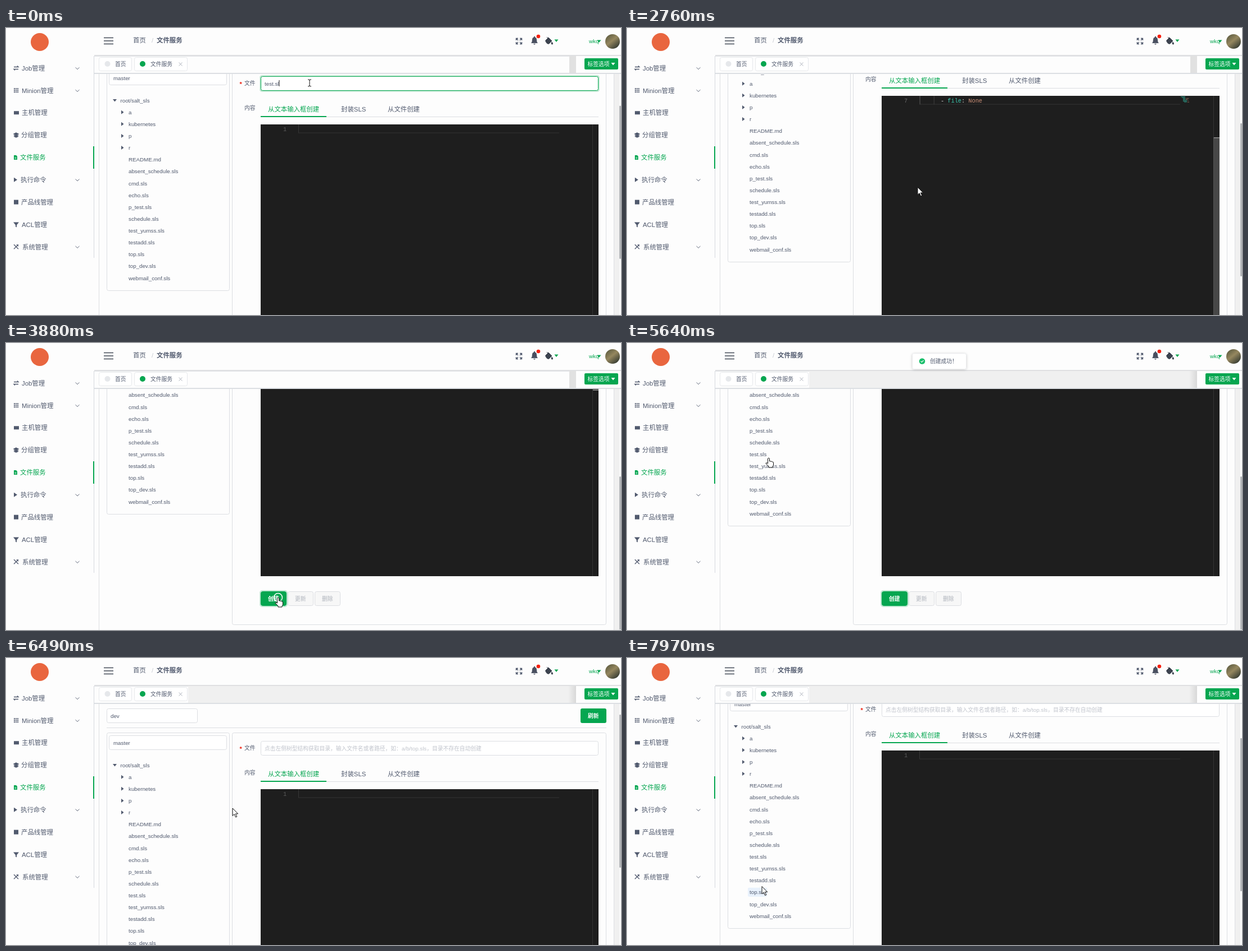
Animation, 1094 px wide and 512 px high, one loop 8 s. Source, as an HTML page:

```html
<!DOCTYPE html>
<html lang="zh">
<head>
<meta charset="utf-8">
<style>
html, body { margin: 0; width: 100%; height: 100%; overflow: hidden; background: #fdfdfd; }
svg { display: block; }
text { font-family: "Liberation Sans", "Noto Sans CJK SC", "Noto Sans CJK", sans-serif; white-space: pre; }
.code text { font-family: "Liberation Mono", "Noto Sans Mono", monospace; }
</style>
</head>
<body>
<svg id="stage" width="1094" height="512" viewBox="0 0 1094 512"></svg>
<script>
const GREEN = '#05a650', INK = '#515a6e', LINE = '#dcdee2', SMALL = 9.75, MID = 11.4;
const ROW = 21.13, CODE_ROW = 15.4, LOOP = 8000;

// Markup helpers; text is placed by the middle of its line.
const text = (s, x, y, size = SMALL, fill = INK, more = '') =>
  `<text x="${x}" y="${y + size * .37}" font-size="${size}" fill="${fill}" ${more}>${s}</text>`;
const rect = (x, y, w, h, fill, more = '') =>
  `<rect x="${x}" y="${y}" width="${w}" height="${h}" fill="${fill}" ${more}/>`;
const box = (x, y, right, bottom, fill = '#fff', stroke = LINE, more = '') =>
  rect(x + .5, y + .5, right - x - 1, bottom - y - 1, fill, `stroke="${stroke}" rx="3" ${more}`);
const path = (d, x, y, fill = INK, stroke = 'none', width = 1) =>
  `<path d="${d}" transform="translate(${x} ${y})" fill="${fill}" stroke="${stroke}" stroke-width="${width}"/>`;
const dot = (x, y, r, fill) => `<circle cx="${x}" cy="${y}" r="${r}" fill="${fill}"/>`;
const group = (id, body, more = '') => `<g id="${id}" ${more}>${body}</g>`;
const clip = (id, x, y, w, h) => `<clipPath id="${id}">${rect(x, y, w, h, '#000')}</clipPath>`;
const BOLD = 'font-weight="700"', DOWN = 'M-3.5-2H3.5L0 2.5Z';

const menu = [
  ['Job管理', 28, 'M-4-2H4L2-4M4 2H-4L-2 4', 1],
  ['Minion管理', 28, 'M-4-4h2v2h-2zm3 0h2v2h-2zm3 0h2v2h-2zm-6 3h2v2h-2zm3 0h2v2h-2zm3 0h2v2h-2zm-6 3h2v2h-2zm3 0h2v2h-2zm3 0h2v2h-2z', 1],
  ['主机管理', 28, 'M-4-3H5V3H-4ZM-2-1V1M0-1V1M2-1V1'],
  ['分组管理', 27, 'M0-4L4-2 0 0-4-2ZM-4 0L0 2 4 0M-4 2L0 4 4 2'],
  ['文件服务', 25, 'M-3-4H1L3-2V4H-3Z'],
  ['执行命令', 26, 'M-3-4L3 0-3 4Z', 1],
  ['产品线管理', 27, 'M-4-4H4V4H-4Z'],
  ['ACL管理', 28, 'M-5-4H5L1 1V5L-1 4V1Z'],
  ['系统管理', 29, 'M-4-4L4 4M4-4L-4 4M1-4L4-1', 1]
];
const sidebar = rect(0, 0, 157, 512, '#fdfdfd') + dot(60, 25, 16, '#e9663f') +
  rect(156, 50, 1, 360, '#d5d9de') + rect(155, 211, 2, 40, GREEN) +
  menu.map(([name, x, icon, opens], i) => {
    const y = 71.5 + i * 39.85, on = i === 4, color = on ? GREEN : INK;
    const lined = [0, 3, 8].includes(i);
    return path(icon, on || i === 5 ? 17 : 18, y, lined && i !== 3 ? 'none' : color, lined ? color : 'none', 1.3) +
      (on ? path('M-1.5 0H1.5M-1.5 2H1.5', 17, y, 'none', '#fff', .8) : '') +
      text(name, x, y, MID, color) +
      (opens ? path('M-3.5-1.7L0 1.7 3.5-1.7', 127, y + .5, 'none', INK, .9) : '');
  }).join('');

const header = rect(157, 0, 937, 49, '#fdfdfd') + rect(157, 48, 937, 2, '#dfe0e2') +
  [17.5, 23, 28.5].map(y => rect(174, y - .8, 17, 1.5, '#444b57')).join('') +
  text('首页', 226, 22, MID) + text('/', 259, 22, MID, '#c9ccd2') + text('文件服务', 268, 22, MID, INK, BOLD) +
  path('M-5-1.5V-5H-1.5M1.5-5H5V-1.5M5 1.5V5H1.5M-1.5 5H-5V1.5M-5-5L-1.5-1.5M5-5L1.5-1.5M5 5L1.5 1.5M-5 5L-1.5 1.5', 912.5, 23.5, 'none', INK, 1.4) +
  path('M-6 4Q-4 2-4-2Q-4-6-1-6.5V-8H1V-6.5Q4-6 4-2Q4 2 6 4ZM-2 5H2Q0 8-2 5Z', 940, 23, '#495060') +
  dot(947, 15, 3.3, '#f5200f') +
  path('M-1-6L5 0 0 5Q-2 6-4 4L-6 1Q-7-1-5-2ZM-4-7L0-3M5 2Q8 6 5.500 6Q3 6 5 2', 966, 23, '#3c434f', '#3c434f') +
  path(DOWN, 979, 22.5, GREEN) + text('wkq', 1037, 23.5, SMALL, GREEN) + path(DOWN, 1055, 23.5, GREEN) +
  dot(1079, 24, 13, 'url(#photo)');

const tabs = rect(157, 50, 937, 31, '#fdfdfd') + rect(157, 50, 857, 1, '#e3e5e8') +
  group('barGray', rect(324, 50, 690, 30, '#f0f0f0') + rect(1000, 50, 14, 30, 'url(#shade)')) +
  group('barBlock', rect(1002, 50, 12, 30, '#e1e1e1')) +
  rect(1014, 50, 80, 31, '#fdfdfd') + rect(157, 80, 937, 2, '#dcdfe3') +
  box(165, 52, 224, 77, '#fff', '#e6e8eb') + dot(180.5, 64, 5, '#e6e8eb') + text('首页', 194, 64.5) +
  box(228, 52, 323, 77, '#fff', '#e6e8eb') + dot(243, 64, 5, GREEN) + text('文件服务', 257, 64.5) +
  path('M-3-3L3 3M3-3L-3 3', 310.5, 64.5, 'none', '#a2a8b2', .9) +
  rect(1029, 54, 60, 20, GREEN, 'rx="2"') + text('标签选项', 1034.5, 64, SMALL, '#fff', 'font-weight="500"') +
  path(DOWN, 1080, 64, '#fff');

// The scrolling page, in coordinates of its topmost position.
const files = ['root/salt_sls', 'a', 'kubernetes', 'p', 'r', 'README.md', 'absent_schedule.sls', 'cmd.sls', 'echo.sls',
  'p_test.sls', 'schedule.sls', 'test.sls', 'test_yumss.sls', 'testadd.sls', 'top.sls', 'top_dev.sls', 'webmail_conf.sls'];
const NEW_FILE = 11;
const tree = files.map((name, i) => `<g class="file">` +
  (i === 0 ? path(DOWN, 193.500, 0) : i < 5 ? path('M-2-3.500L2.500 0-2 3.500Z', 207, 0) : '') +
  text(name, i ? 218 : 203.5, 0) + '</g>').join('');

const script = [[0, 'touch_file', ''], [2, 'cmd.run', ''], [4, '- name', 'uptime'], [4, '- cwd', '/tmp'],
  [4, '- timeout', '10'], [4, '- require', ''], [6, '- file', 'None']];
const CHAR = 6.17;
const codeLine = ([indent, key, value], i) => {
  const y = 242 + i * CODE_ROW, dash = key.startsWith('- ') ? '- ' : '';
  const paint = (s, color) => `<tspan fill="${color}">${s}</tspan>`;
  return text(i + 1, 493, y, 10.28, '#6a6a6a') +
    [0, 4].filter(n => n < indent).map(n => rect(521 + n * CHAR, y - 8, 1, CODE_ROW, '#404040')).join('') +
    text(paint(dash, '#d4d4d4') + paint(key.slice(dash.length), '#3dc9b0') + paint(': ', '#d4d4d4') + paint(value, '#ce9178'),
      521 + indent * CHAR, y, 10.28);
};
const lineFrame = y => rect(520, y, 1, CODE_ROW, '#383838') + rect(520, y + 14.5, 464, 1.2, '#303030');
const editor = rect(453, 234, 601, 407, '#1e1e1e') +
  `<g class="code" clip-path="url(#editorClip)">` +
  group('blank', lineFrame(234) + text('1', 493, 242, 10.28, '#5a5a5a')) +
  group('script', lineFrame(234 + 6 * CODE_ROW) + script.map(codeLine).join('')) + '</g>' +
  group('map', script.map(([n, key, value], i) => rect(985 + n, 235 + i * 1.6, key.length * .8, 1, '#2b8a7a') +
    rect(986 + n + key.length * .8, 235 + i * 1.6, value.length * .8, 1, '#8a6554')).join('') +
    rect(1043, 308, 11, 1.5, '#a0a0a0')) +
  rect(1043, 234, 1, 407, '#343434') +
  group('slider', rect(1043, 0, 11, 331, '#797979', 'opacity=".45"')) +
  group('editCaret', rect(520, 235, 2, 14, '#d0d0d0'));

const button = (s, x, fill, stroke, color) => box(x, 668, x + 46, 694, fill, stroke) + text(s, x + 13, 681, SMALL, color, BOLD);
const page = rect(165, -300, 917, 1400, '#fdfdfd') + rect(165, -300, 1, 1400, LINE) +
  rect(1081, -300, 1, 1400, LINE) + rect(1082, -300, 9, 1400, '#f0f0f0') +
  box(179, 90, 341, 116) + text('dev', 186, 103) +
  rect(1022, 90, 46, 26, GREEN, 'rx="3"') + text('刷新', 1035, 103, SMALL, '#fff', BOLD) +
  rect(179, 124, 889, 1, LINE) +
  rect(179.5, 133.5, 218, 397, '#fdfdfd', `id="treeBox" stroke="${LINE}" rx="3"`) +
  box(402, 133, 1068, 728, '#fdfdfd') +
  box(183, 138, 393, 164) + text('master', 191, 151) +
  rect(215, 0, 10, 16, '#e8f1fc', 'id="hover" rx="2"') + tree +
  text('*', 415.500, 162, 11, '#ed1c0c', BOLD) + text('文件', 424, 160) + text('内容', 424, 204.500) +
  box(453, 148, 1054, 174) +
  group('focus', box(452, 147, 1055, 175, 'none', GREEN, 'stroke-width="3" opacity=".22"') + box(453, 148, 1054, 174, '#fff', GREEN)) +
  group('hint', text('点击左侧树型结构获取目录，输入文件名或者路径，如：a/b/top.sls，目录不存在自动创建', 460, 161, SMALL, '#c0c4cc')) +
  group('typed', text('', 460, 161)) + rect(486, 155, 1, 11, '#222', 'id="caret"') +
  rect(453, 220, 601, 1, LINE) + rect(453, 219, 117, 2, GREEN) +
  text('从文本输入框创建', 466, 207, MID, GREEN) + text('封装SLS', 596, 207, MID) + text('从文件创建', 679, 207, MID) +
  editor +
  group('glow', rect(452, 667, 48, 28, 'none', `rx="4" stroke="${GREEN}" stroke-width="2" opacity=".25"`)) +
  button('创建', 453, GREEN, GREEN, '#fff') + button('更新', 501, '#f7f7f7', LINE, '#c5c8ce') +
  button('删除', 549, '#f7f7f7', LINE, '#c5c8ce');

const message = box(507, 18, 604, 47, '#fff', '#e9eaec', 'filter="url(#soft)"') + dot(525, 32.5, 5.3, '#19be6b') +
  path('M-2.500 0L-.7 1.800 2.500-1.500', 525, 32.5, 'none', '#fff', 1.1) + text('创建成功！', 539, 32.5);

const cursors = {
  beam: 'M-3-6H-1L0-5 1-6H3M0-5V5M-3 6H-1L0 5 1 6H3',
  arrow: 'M0 0V13.500L3.200 10.600 5.600 16 7.800 15 5.400 9.900H9.700Z',
  hand: 'M-1.500 1Q0-1 1.500 1V6Q3 5 4 6.500Q5.500 5.500 6.500 7Q8.500 6.500 8.500 9V12Q8.500 14 7 15V17H0V15L-5 10Q-5 8-3 9L-1.500 10Z'
};

document.getElementById('stage').innerHTML = `<defs>
  ${clip('pageClip', 157, 80, 937, 432)}${clip('editorClip', 453, 234, 590, 407)}
  <linearGradient id="shade"><stop stop-color="#f0f0f0"/><stop offset="1" stop-color="#d8d8d8"/></linearGradient>
  <linearGradient id="photo" x2=".8" y2="1"><stop stop-color="#50523a"/><stop offset=".5" stop-color="#95875f"/><stop offset="1" stop-color="#30372f"/></linearGradient>
  <filter id="soft" x="-10%" y="-30%" width="120%" height="170%"><feDropShadow dx="0" dy="1" stdDeviation="2" flood-opacity=".18"/></filter>
  </defs>` + rect(0, 0, 1094, 512, '#fdfdfd') +
  `<g clip-path="url(#pageClip)">${group('page', page)}</g>` +
  rect(1091, 82, 3, 430, '#fafafa') + rect(1091, 101, 3, 273, '#b4b6b9', 'id="thumb" rx="1"') +
  sidebar + header + tabs + group('message', message) +
  group('pointer', `<circle id="ring" r="7.500" fill="none" stroke="#fff" stroke-width="1.500"/>
    <path id="cursor" stroke="#111" stroke-linejoin="round"/>`);

// Time tracks: [time, value, ...] with straight runs between.
const scrollTrack = [[0, 62], [2520, 62], [2760, 113], [2900, 113], [3480, 225], [6110, 225], [6480, 0],
  [6610, 0], [7120, 63], [7300, 63], [7800, 69]];
const pointerTrack = [[0, 540, 98], [600, 540, 98], [1300, 563, 191], [2350, 563, 191], [2700, 517, 284],
  [3340, 517, 284], [3850, 484, 454], [4030, 484, 454], [4550, 360, 320], [4790, 290, 240], [5000, 290, 240],
  [5600, 252, 205], [5790, 252, 205], [6060, 390, 360], [6450, 403, 268], [6610, 403, 268],
  [7120, 300, 345], [7270, 300, 345], [7850, 240, 407.5]];
const at = (track, t) => {
  const i = track.findIndex(k => k[0] > t);
  if (i < 0) return track.at(-1).slice(1);
  const a = track[i - 1], b = track[i], p = (t - a[0]) / (b[0] - a[0]);
  return a.slice(1).map((v, n) => v + (b[n + 1] - v) * p);
};
const ramp = (t, from, to) => Math.min(1, Math.max(0, (t - from) / (to - from)));

const $ = id => document.getElementById(id);
const show = (id, on) => $(id).setAttribute('opacity', +on);
const move = (el, x, y) => el.setAttribute('transform', `translate(${x} ${y})`);
const fileRows = [...document.querySelectorAll('.file')];
const widths = fileRows.map(row => row.querySelector('text').getComputedTextLength());
const typed = $('typed').firstChild;

function draw(t) {
  const [scroll] = at(scrollTrack, t), [x, y] = at(pointerTrack, t);
  move($('page'), 0, -Math.round(scroll));
  $('thumb').setAttribute('y', 101 + scroll * .61);

  const added = t >= 4670;
  let hovered = -1;
  fileRows.forEach((row, i) => {
    const rowY = 191 + ROW * (i - (!added && i > NEW_FILE));
    const shown = added || i !== NEW_FILE;
    move(row, 0, rowY);
    row.setAttribute('opacity', +shown);
    if (shown && i && Math.abs(y + scroll - rowY) < ROW / 2 && x > 215 && x < 221 + widths[i]) {
      hovered = i;
      $('hover').setAttribute('y', rowY - 8);
      $('hover').setAttribute('width', widths[i] + 6);
    }
  });
  show('hover', hovered > 0);
  $('treeBox').setAttribute('height', added ? 418 : 397);

  const cleared = t >= 4500, inField = t < 1300;
  show('focus', inField);
  show('caret', inField);
  show('hint', cleared);
  typed.textContent = cleared ? '' : t < 150 ? 'test.sl' : 'test.sls';
  $('caret').setAttribute('x', t < 150 ? 485.5 : 490.5);

  const pasted = t >= 1890 && !cleared, rolled = ramp(t, 2430, 2650);
  show('blank', !pasted);
  show('script', pasted);
  show('map', pasted);
  show('editCaret', t >= 1300 && t < 1890);
  move($('script'), 0, -6 * CODE_ROW * rolled);
  move($('slider'), 0, 234 + 74 * rolled);
  show('slider', pasted ? 1 - ramp(t, 3500, 3750) : 0);

  show('glow', t >= 3850 && t < 6500);
  show('barGray', t >= 4400);
  show('barBlock', t < 4400);
  const note = ramp(t, 4500, 4700) * (1 - ramp(t, 6050, 6250));
  show('message', note);
  move($('message'), 0, -47 * (1 - note));

  const kind = t < 1000 ? 'beam' : t >= 3700 && t < 4150 || t >= 5450 && t < 5850 ? 'hand' : 'arrow';
  $('cursor').setAttribute('d', cursors[kind]);
  $('cursor').setAttribute('fill', kind === 'beam' ? 'none' : '#fff');
  move($('pointer'), x, y);
  show('ring', t >= 3840 && t < 4030);
}

const start = performance.now();
function tick() {
  draw((performance.now() - start) % LOOP);
  requestAnimationFrame(tick);
}
tick();
</script>
</body>
</html>
```
